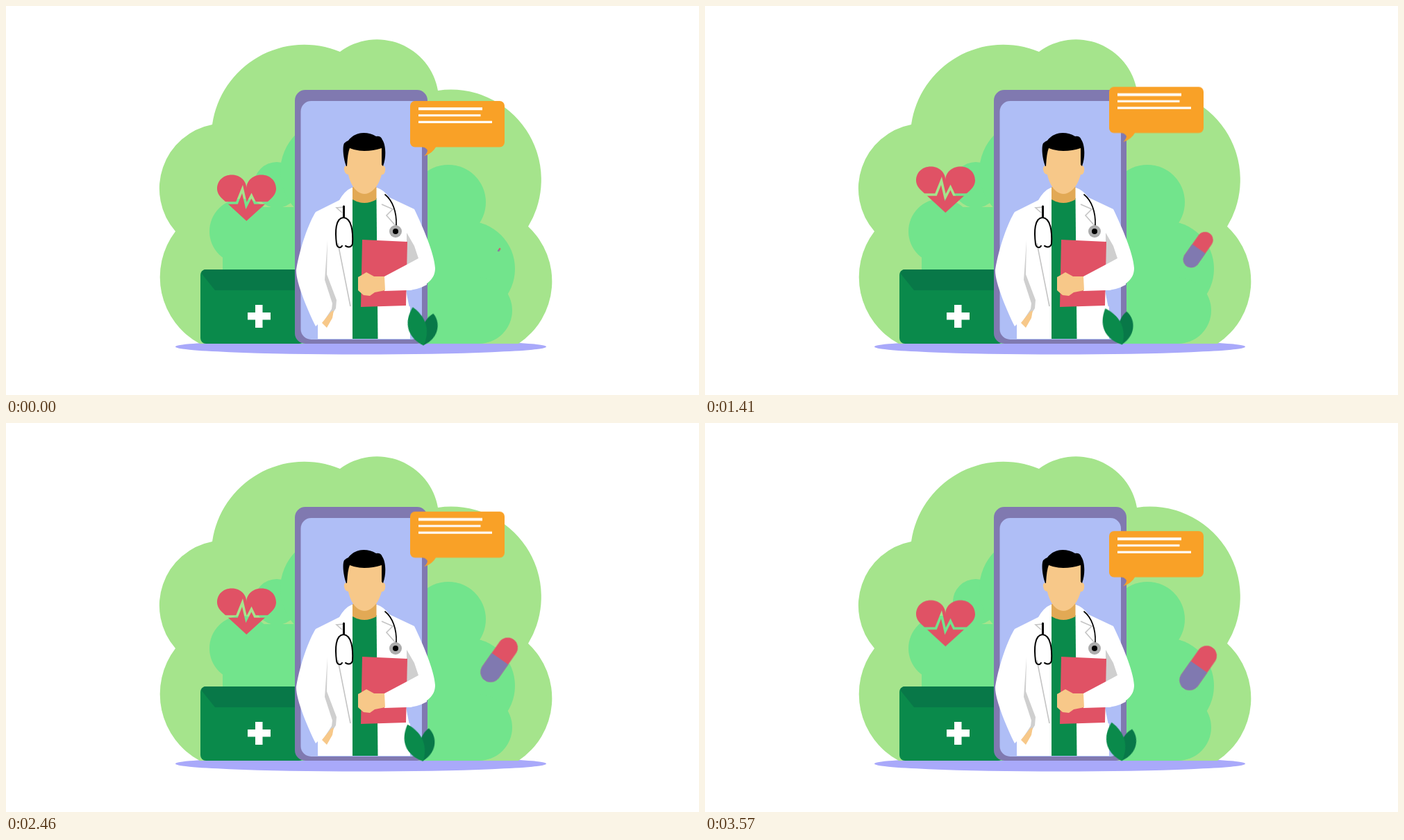
These frames come from a looping animation (998x561 px, 3600 ms). An HTML page without scripts:

```html
<!DOCTYPE html>
<html lang="en">
<head>
<meta charset="utf-8">
<title>Online doctor</title>
<style>
  html, body { margin: 0; width: 100%; height: 100%; overflow: hidden; background: #fff; }
  svg { display: block; width: 998px; height: 561px; }

  .light { fill: #a5e48c; }
  .mid { fill: #72e48c; }
  .green { fill: #0a8a4b; }
  .dark { fill: #087848; }
  .purple { fill: #8079b0; }
  .red { fill: #e05265; }
  .orange { fill: #f9a127; }
  .skin { fill: #f7c889; }
  .white { fill: #fff; }
  .shade { fill: #cfcfcf; }
  .crease { fill: none; stroke: #c4c4c4; stroke-width: 1.6; }
  .tube { fill: none; stroke: #000; stroke-width: 2; stroke-linecap: round; }

  .bubble, .heart, .pill, .pill-size, .leaves { animation: 3.6s linear infinite; }
  .bubble { animation-name: bubble; }
  .heart { animation-name: heart; }
  .pill { animation-name: pill; }
  .pill-size { animation-name: grow; }
  .leaves { animation-name: sway; transform-origin: 600px 488px; }

  @keyframes bubble {
    0% { transform: translateY(0); }
    50% { transform: translateY(-26px); }
    100% { transform: translateY(19.6px); }
  }
  @keyframes heart {
    0% { transform: translateY(0); }
    50% { transform: translateY(-15.3px); }
    100% { transform: translateY(12.6px); }
  }
  @keyframes pill {
    0%, 50% { transform: translate(710.2px, 351.5px); }
    75% { transform: translate(710.2px, 338px); }
    100% { transform: translate(710.2px, 353.8px); }
  }
  @keyframes grow {
    0% { transform: scale(.08); }
    50%, 100% { transform: scale(1); }
  }
  @keyframes sway {
    0% { transform: translate(.6px, 1.5px) rotate(12deg); }
    50% { transform: none; }
    100% { transform: translate(-.4px, -.8px) rotate(13deg); }
  }
</style>
</head>
<body>
<svg viewBox="0 0 998 561" xmlns="http://www.w3.org/2000/svg">
  <ellipse cx="511" cy="491.5" rx="267" ry="11" fill="#a9a9fa"/>

  <path class="light" d="M279 487A109 109 0 0 1 244 325A94 94 0 0 1 297 171A134 134 0 0 1 481 66
    A89 89 0 0 1 622 122A130 130 0 0 1 752 318A108 108 0 0 1 738 487Z"/>
  <g class="mid">
    <circle cx="340" cy="325" r="47"/>
    <circle cx="390" cy="258" r="33"/>
    <circle cx="471" cy="239" r="76"/>
    <rect x="312" y="290" width="118" height="197"/>
    <circle cx="637" cy="283" r="54"/>
    <circle cx="664" cy="379" r="69"/>
    <circle cx="681" cy="439" r="48"/>
    <rect x="600" y="283" width="81" height="204"/>
  </g>

  <!-- first-aid box -->
  <rect class="green" x="280" y="380" width="150" height="107" rx="8"/>
  <path class="dark" d="M281 385Q283 380 288 380H430V410H301Z"/>
  <path class="white" d="M359 431h10.5v11H381v10.500h-11.500v11.500H359v-11.500h-11v-10.500h11Z"/>

  <!-- phone -->
  <rect class="purple" x="416" y="121" width="191" height="366" rx="15"/>
  <rect x="424.500" y="137" width="174.500" height="344" rx="15" fill="#afbef6"/>

  <!-- doctor -->
  <path class="white" d="M498 262Q488 266 480 280L446 297C437 311 424 345 418 380C417 398 435 440 446 462L449 459
    V480H582V410C606 404 618 394 618 378C617 357 600 318 588 293L552 276Q544 265 534 262Z"/>
  <path fill="#afbef6" d="M576 410H583V434L580.500 433Z"/>
  <path class="green" d="M499 277H533.500L535.500 480H499Z"/>
  <path fill="#e2a955" d="M499 261H533.500V279Q516 289 499 279Z"/>
  <path class="shade" d="M463 338L462 387L476 424L475 436L465 452L456 457L469 437L470 429L459 395Z"/>
  <path class="skin" d="M455 457L468 441L472 439L470 450L462 464Z"/>
  <path class="shade" d="M577 327L588 346L594 364L577 374Z"/>
  <path class="crease" d="M478 342L496 433M487 290L476 291L484 298M541 286L557 293L548 302L562 318"/>

  <path class="skin" d="M492 203H541L543 230Q547 231 546 238Q545 244 541 243C537 259 527 271 516 271
    C505 271 496 258 493 243Q488 243 487 236Q486 231 491 230Z"/>
  <path d="M490 231C486 221 484 204 487 198Q490 195 493 194C499 186 507 183 515 183Q525 183 533 188
    Q540 187 542 193C547 200 548 218 543 231L541 229V205Q529 209 516 209Q504 209 495 205Q492 212 491 231Z"/>

  <path class="tube" stroke-width="3" d="M486.500 289V304" style="stroke-width:3"/>
  <path class="tube" d="M482 348Q477 349 476 343C474 326 474 306 486 305C498 306 500 326 499 343Q497 349 491 347M484 346L482 348M489 346L491 347"/>
  <path class="tube" style="stroke-width:1.700" d="M546 272C556 280 563 296 562 317"/>
  <circle cx="561" cy="325" r="9" fill="#adadad"/>
  <circle cx="561" cy="325" r="4"/>

  <path class="red" d="M513 337L578 340L576 432L511 434Z"/>
  <path class="white" d="M545 390L594 364L606 370L606 402Q592 410 576 410L545 411Z"/>
  <path class="skin" d="M507 391L519 384L530 390L545 390L546 410L531 413L524 418L515 417L507 410Z"/>

  <g class="leaves">
    <path class="dark" d="M600 488C590 470 593 450 605 440C616 448 623 471 600 488Z"/>
    <path class="green" d="M601 488C580 483 564 466 574 437C594 446 606 462 601 488Z"/>
  </g>

  <g class="bubble">
    <rect class="orange" x="582" y="137" width="136" height="66.500" rx="7"/>
    <path class="orange" d="M597 202Q605 204 607 208Q607 212 602 216.500Q614 213 620 202Z"/>
    <path class="white" d="M594 146.300H686V150.200H594ZM594 156.300H683.500V159.300H594ZM594 165.700H700V169H594Z"/>
  </g>

  <mask id="pulse" maskUnits="userSpaceOnUse" x="295" y="235" width="105" height="85">
    <rect x="295" y="235" width="105" height="85" fill="#fff"/>
    <path d="M300 284H332.500L340.500 264L346 288L353.500 273.500L358.500 284H395" fill="none" stroke="#000" stroke-width="3.600"/>
  </mask>
  <g class="heart">
    <path class="red" mask="url(#pulse)" d="M346.300 310L312 278.500C307 274 304 269 304 263.500C304 252 313 243.500 325 243.500
      C336 243.500 346.300 251 346.300 263C346.300 251 357 243.500 368 243.500C380 243.500 389 252 389 263.500C389 269 386 274 381 278.500Z"/>
  </g>

  <g class="pill"><g class="pill-size"><g transform="rotate(35)">
    <rect class="red" x="-14.500" y="-36" width="29" height="72" rx="14.500"/>
    <path class="purple" d="M-14.500 -2H14.500V21.500A14.500 14.500 0 0 1 -14.500 21.500Z"/>
  </g></g></g>
</svg>
</body>
</html>
```
